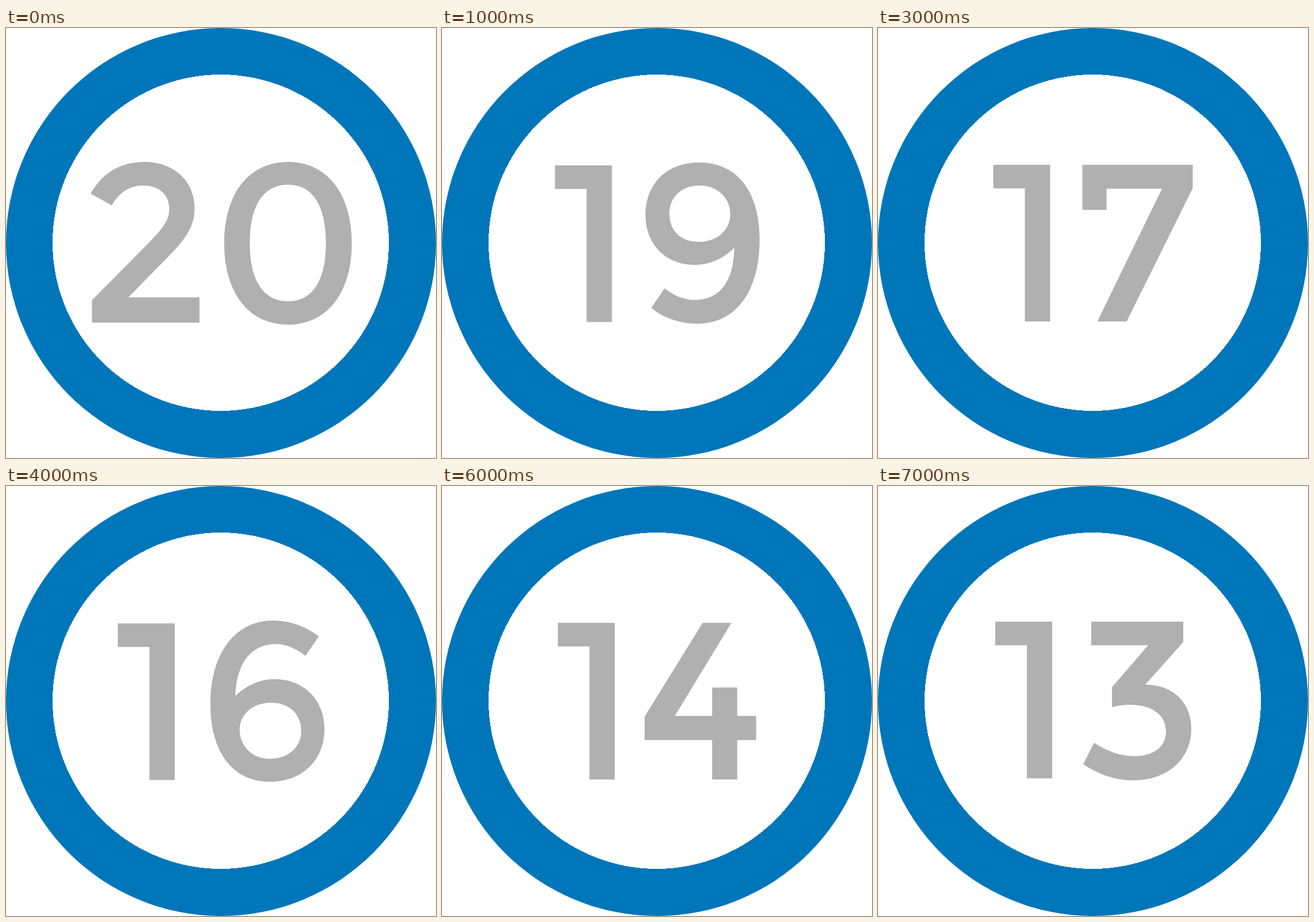
Animation of 748 by 748 pixels, one loop 8000 ms. Source, as an HTML page:

```html
<!DOCTYPE html>
<html lang="en">
<head>
<meta charset="utf-8">
<title>Countdown</title>
<style>
  html, body { margin: 0; width: 100%; height: 100%; overflow: hidden; background: #fff; }
  svg { display: block; width: 100vw; height: 100vh; }
</style>
</head>
<body>
<svg viewBox="0 0 748 748" role="img" aria-label="Countdown">
  <circle cx="374" cy="374" r="374" fill="#0076ba"/>
  <circle cx="373.5" cy="373.5" r="292.5" fill="#fff" shape-rendering="crispEdges"/>
  <path id="number" fill="#b0b0b0" fill-rule="evenodd"/>
</svg>
<script>
const STEP = 1000;

const one = (x, y) => `M${x} ${y}h99v272.5h-44v-231.5h-55z`;

// Outlines of the numbers, counting down from 20
const numbers = [
  // 20
  `M147 288C168 253 197 233 241 233C290 233 328 264 328 314C328 343 315 365 281 399
   L213 468.5H336.5V512.5H149.5V473.5L251 371C277 344 284 332 284 314
   C284 290 266 274 239 274C215 274 197 286 184 308.5Z
   M490.5 233C560 233 601.5 290 601.5 374.5S560 516 490.5 516S379.5 459 379.5 374.5S421 233 490.5 233Z
   M490.5 272.5C447 272.5 424 310 424 374S447 475.5 490.5 475.5S556.5 438 556.5 374S534 272.5 490.5 272.5Z`,
  // 19
  one(196.5, 239) +
  `M447 234C515 234 552.5 286 552.5 368C552.5 460 510 514.5 444 514.5
   C414 514.5 385 504 364 487L387 453C404 466 422 473 439 473
   C482 473 507 444 508.5 382C489 402 465 412 439 412
   C389 412 354 376 354 325C354 270 392 234 447 234Z
   M448 274C417 274 395.5 294 395.5 323S415 372 447 372S501.5 351 501.5 324S481 274 448 274Z`,
  // 18
  one(193.5, 239) +
  `M454.5 233.5C508 233.5 543 261 543 305C543 332 530 352 508 365
   C538 378 555.5 402 555.5 434C555.5 484 516 515 454.5 515
   S353.5 484 353.5 434C353.5 402 371 378 401 365
   C379 352 366 332 366 305C366 261 401 233.5 454.5 233.5Z
   M454.5 271.5C426 271.5 408 285 408 310S426 348.5 454.5 348.5S501 335 501 310S483 271.5 454.5 271.5Z
   M454.5 383.5C419 383.5 398 401 398 430S419 477 454.5 477S511 459 511 430S490 383.5 454.5 383.5Z`,
  // 17
  one(200.5, 238) +
  `M355.5 238H547.5V278.5L432.5 510.5H381.5L494 279.5H397.5V316.5H355.5Z`,
  // 16
  one(194.5, 239) +
  `M464 234C495 234 522 245 544 261.5L521 295.5C504 282 486 275 469 275
   C427 275 401 307 399 365C419 346 442 336 467 336
   C518 336 554 372 554 423C554 478 514 514.5 459 514.5
   C393 514.5 355.5 461 355.5 380C355.5 289 400 234 464 234Z
   M461 377C429 377 406.5 397 406.5 424S427 474.5 459 474.5S513.5 455 513.5 426S493 377 461 377Z`,
  // 15
  one(202.5, 236) +
  `M385 236H532V277H423L418.5 342H440C510 342 545.5 374 545.5 424
   C545.5 475 507 512 444 512C411 512 381 501 355.5 484L375 446.5
   C393 461 419 470 446 470C481 470 502 454 502 427
   C502 400 483 382.5 430 382.5H374Z`,
  // 14
  one(201.5, 238) +
  `M453.5 238H503.5L405 400H470V350.5H513.5V400H546.5V442H513.5V510.5H470V442H352.5V401Z`,
  // 13
  one(204, 236) +
  `M371 236H531V271.5L465 345.5C513 345.5 545 377 545 422
   C545 475 504 512 444 512C412 512 382 501 357 484L376 446.5
   C397 461 422 470 446 470C479 470 501 454 501 427
   C501 400 479 380.5 438 380.5C426 380.5 416 382 407 385V350L470 277H371Z`
];

const number = document.getElementById('number');
const start = performance.now();
let shown = -1;

function draw() {
  const i = Math.floor((performance.now() - start) / STEP) % numbers.length;
  if (i !== shown) number.setAttribute('d', numbers[shown = i]);
  requestAnimationFrame(draw);
}
draw();
</script>
</body>
</html>
```
